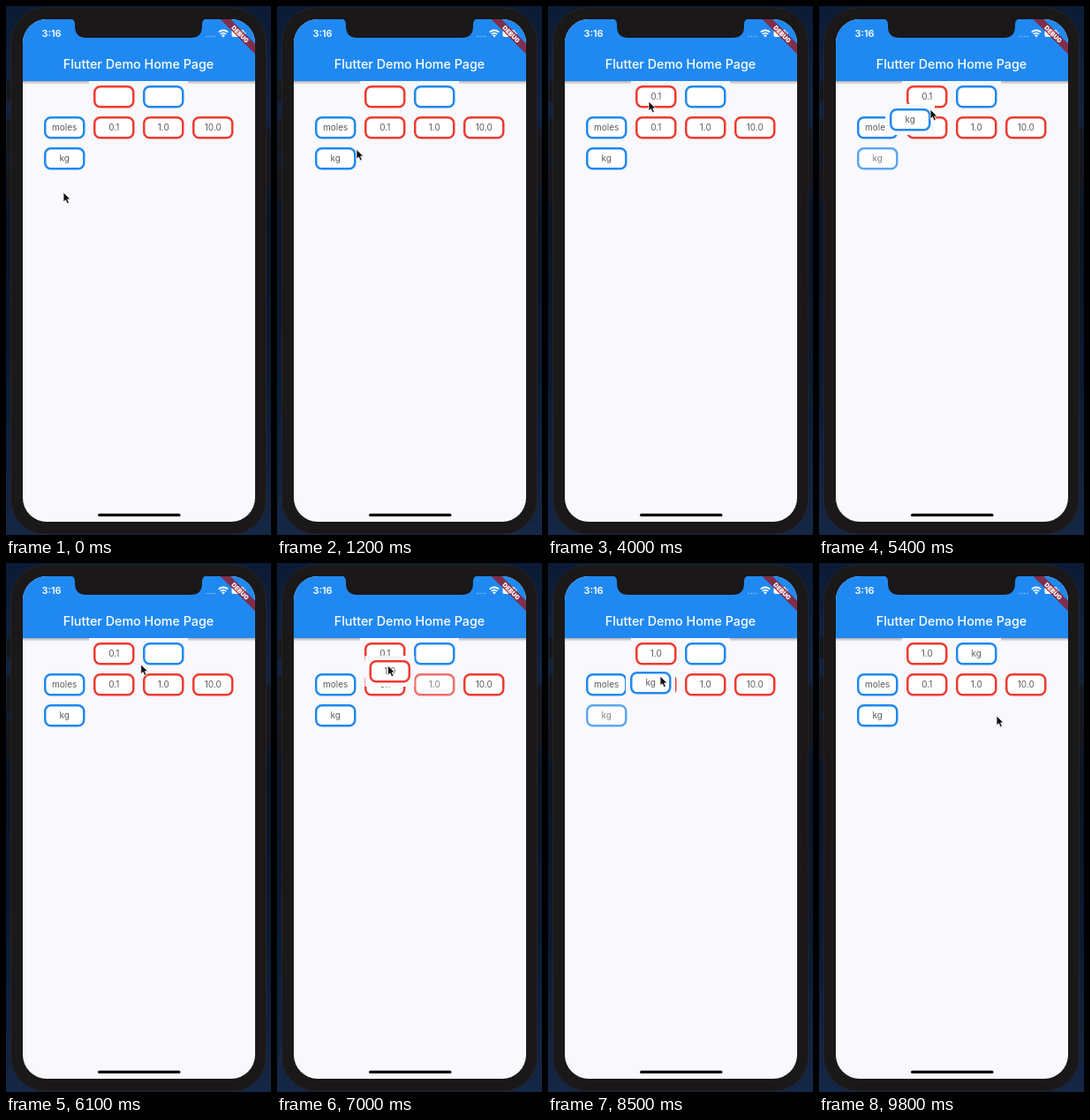
Animation, 300 px wide and 599 px high, one loop 9.9 s. Source, as an HTML page:

```html
<!DOCTYPE html>
<html lang="en">
<head>
<meta charset="utf-8">
<style>
  html, body { margin: 0; width: 100%; height: 100%; overflow: hidden; background: #071225; }
  svg { display: block; width: 300px; height: 599px; }
  text { font-family: Inter, Roboto, sans-serif; text-anchor: middle; }
</style>
</head>
<body>
<svg viewBox="0 0 300 599">
  <defs>
    <linearGradient id="sky" x1="0" y1="0" x2="0" y2="1">
      <stop offset="0" stop-color="#0b1b35"/>
      <stop offset=".2" stop-color="#12233f"/>
      <stop offset=".4" stop-color="#0a1424"/>
      <stop offset=".7" stop-color="#0b1a33"/>
      <stop offset="1" stop-color="#152746"/>
    </linearGradient>
    <linearGradient id="shade" x1="0" y1="0" x2="0" y2="1">
      <stop offset="0" stop-opacity=".3"/>
      <stop offset="1" stop-opacity="0"/>
    </linearGradient>
    <clipPath id="screen"><rect x="19" y="15" width="263" height="569" rx="27"/></clipPath>
  </defs>
  <rect width="300" height="599" fill="url(#sky)"/>
  <g fill="#17171b">
    <rect x="1" y="85" width="6" height="23" rx="1.5"/>
    <rect x="1" y="128" width="6" height="43" rx="1.5"/>
    <rect x="1" y="177" width="6" height="43" rx="1.5"/>
    <rect x="293" y="139" width="6" height="69" rx="1.5"/>
  </g>
  <rect x="5.5" y="2" width="289" height="596" rx="39" fill="#1a1819" stroke="#252427"/>
  <g clip-path="url(#screen)">
    <rect x="19" y="15" width="263" height="569" fill="#f9f8fc"/>
    <rect x="19" y="85" width="263" height="4" fill="url(#shade)"/>
    <rect x="19" y="15" width="263" height="70" fill="#2089f1"/>
    <path d="M72 14 Q78 15 78 21 V23 Q78 36 91 36 H209 Q222 36 222 23 V21 Q222 15 228 14Z" fill="#1a1819"/>
    <text x="51.5" y="35" font-size="11" font-weight="600" fill="#fff">3:16</text>
    <g fill="#8fc4f8">
      <circle cx="227" cy="34.5" r=".8"/><circle cx="230" cy="34.5" r=".8"/>
      <circle cx="233" cy="34.5" r=".8"/><circle cx="236" cy="34.5" r=".8"/>
    </g>
    <g fill="none" stroke="#fff" stroke-width="1.7">
      <path d="M240.7 29.6 Q246 25.4 251.3 29.6"/>
      <path d="M242.7 31.9 Q246 29.3 249.3 31.9"/>
    </g>
    <path d="M244 33.2 Q246 31.9 248 33.2 L246 35.4Z" fill="#fff"/>
    <rect x="255.5" y="27" width="14" height="8" rx="2" fill="#fff"/>
    <rect x="270.2" y="29.5" width="1.2" height="3" rx=".6" fill="#fff"/>
    <text x="150" y="70.5" font-size="14.3" font-weight="500" fill="#fff">Flutter Demo Home Page</text>
    <g transform="translate(282 15) rotate(45)">
      <rect x="-40" y="19.6" width="80" height="8.4" fill="#941a28" fill-opacity=".82"/>
      <text y="26.4" font-size="7" font-weight="900" fill="#fff">DEBUG</text>
    </g>
    <g id="chips"></g>
    <rect x="104" y="574.7" width="93.5" height="3.4" rx="1.7" fill="#050505"/>
  </g>
  <path id="cursor" d="M0 0 V11 L2.5 8.7 L4.3 12.8 L6.4 11.9 L4.7 7.9 H8Z" fill="#111" stroke="#fff" stroke-width=".8" stroke-linejoin="round"/>
</svg>
<script>
const LOOP = 9900, STEP = 100;
const RED = '#ee3b31', BLUE = '#2189ee', PAGE = '#f9f8fc';
const NS = 'http://www.w3.org/2000/svg';
const layer = document.getElementById('chips');
const cursor = document.getElementById('cursor');

function add(parent, tag, attrs) {
  const el = document.createElementNS(NS, tag);
  for (const k in attrs) el.setAttribute(k, attrs[k]);
  return parent.appendChild(el);
}

function chip(x, y, color, label) {
  const g = add(layer, 'g', {});
  add(g, 'rect', { x: -5, y: -5, width: 56, height: 35, fill: PAGE });
  add(g, 'rect', { x: 1.25, y: 1.25, width: 44, height: 23, rx: 6.5, fill: '#fff', stroke: color, 'stroke-width': 2.5 });
  const text = add(g, 'text', { x: 23.2, y: 16.2, 'font-size': 10, fill: '#5b5b5d' });
  const c = {
    x, y, color, label,
    move(px, py) { g.setAttribute('transform', `translate(${px} ${py})`); },
    say(s) { text.textContent = s; },
    fade(o) { g.setAttribute('opacity', o); },
    tint(s) { g.children[1].setAttribute('stroke', s); }
  };
  c.move(x, y);
  c.say(label);
  return c;
}

const redSlot = chip(99, 90, RED, '');
const blueSlot = chip(155, 90, BLUE, '');
const moles = chip(43, 125, BLUE, 'moles');
const tenth = chip(99, 125, RED, '0.1');
const one = chip(155, 125, RED, '1.0');
const ten = chip(211, 125, RED, '10.0');
const kg = chip(43, 160, BLUE, 'kg');
const ghost = chip(0, 0, RED, '');

// pointer stops: time, x, y
const path = [
  [0, 65, 211], [500, 65, 211], [1700, 105, 133], [2600, 105, 133],
  [3500, 114, 108], [4100, 114, 108], [4700, 89, 161], [4900, 89, 161],
  [5400, 126, 117], [5700, 140, 106], [5900, 140, 106], [6400, 176, 131],
  [6600, 176, 131], [7000, 125.5, 116], [7200, 120, 98], [7400, 120, 98],
  [7900, 77, 165], [8100, 77, 165], [8500, 127, 128], [8900, 183, 97],
  [9200, 183, 97], [9700, 201, 173], [9900, 201, 173]
];

// each drag lifts a copy of a chip; a slot keeps the value if accepted
const drags = [
  { chip: tenth, from: 2600, to: 3900, slot: redSlot },
  { chip: kg, from: 4900, to: 5900 },
  { chip: one, from: 6600, to: 7400, slot: redSlot },
  { chip: kg, from: 8100, to: 9100, slot: blueSlot }
];

function pointer(t) {
  const i = path.findIndex(p => p[0] > t);
  const [t0, x0, y0] = path[i - 1], [t1, x1, y1] = path[i];
  const u = (t - t0) / (t1 - t0), e = u * u * (3 - 2 * u);
  return [x0 + (x1 - x0) * e, y0 + (y1 - y0) * e];
}

function draw(t) {
  const [x, y] = pointer(t);
  cursor.setAttribute('transform', `translate(${x} ${y})`);
  redSlot.say('');
  blueSlot.say('');
  kg.fade(1); one.fade(1); tenth.fade(1); ghost.fade(0);
  for (const d of drags) {
    if (t >= d.to && d.slot) d.slot.say(d.chip.label);
    if (t < d.from || t >= d.to) continue;
    const [gx, gy] = pointer(d.from);
    d.chip.fade(.72);
    ghost.fade(1);
    ghost.tint(d.chip.color);
    ghost.say(d.chip.label);
    ghost.move(d.chip.x + x - gx, d.chip.y + y - gy);
  }
}

function tick() {
  draw(Math.floor(performance.now() % LOOP / STEP) * STEP);
  requestAnimationFrame(tick);
}
tick();
</script>
</body>
</html>
```
